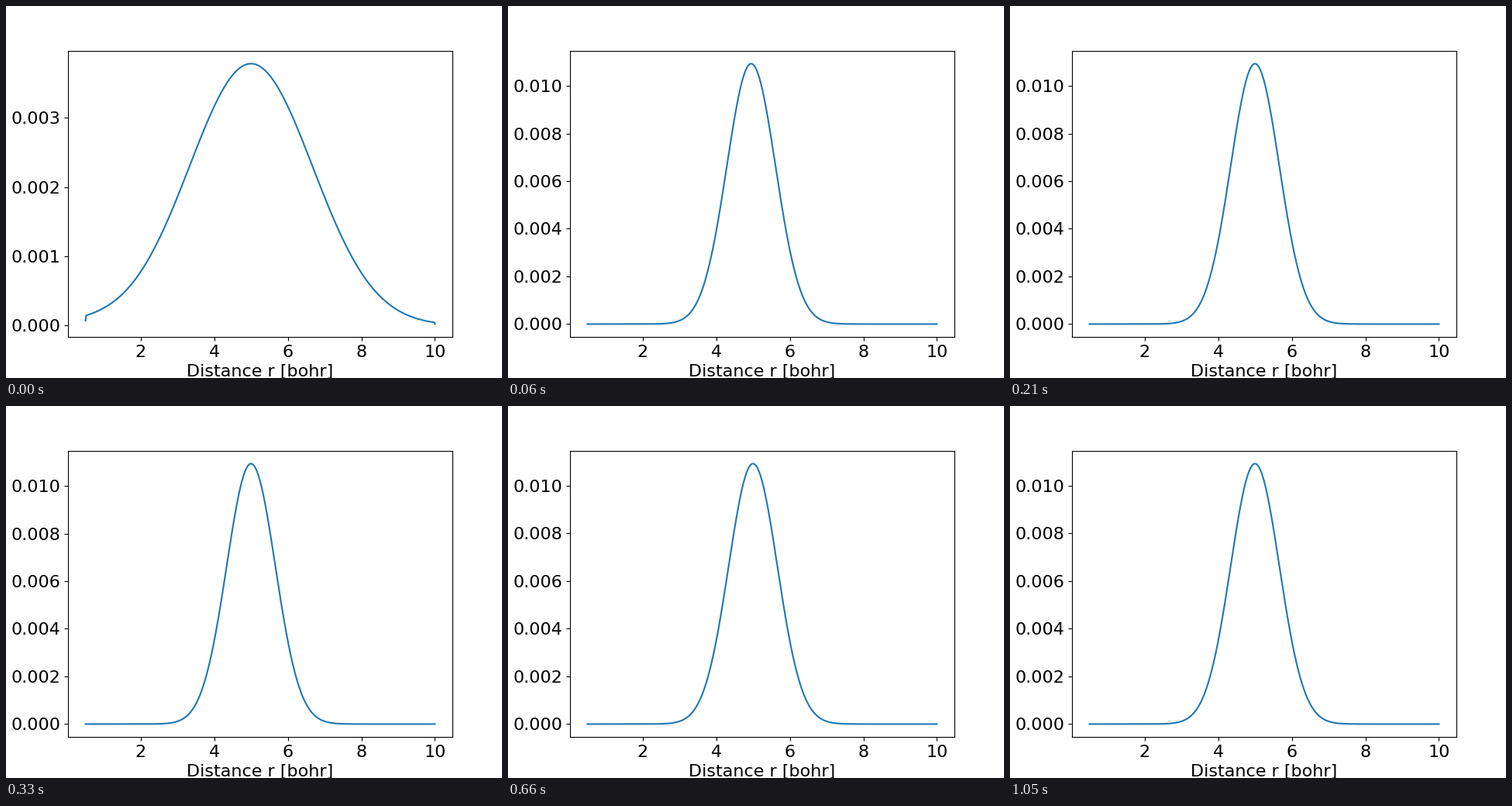
A matplotlib script for the animation above (1.87 s loop, 640x480 px).

```python
import numpy as np
import matplotlib.pyplot as plt
from matplotlib.animation import FuncAnimation

plt.rcParams.update({"font.family": "DejaVu Sans", "font.size": 16})

LOOP_MS = 1870
TICK_MS = 10
STEP_MS = 30
LAST_STEP = 35

r = np.linspace(0.5, 10, 500)


def gauss(height, center, decay):
    return height * np.exp(-decay * (r - center) ** 2)


def start_density():
    """Broad first guess; the end points carry half weight."""
    rho = gauss(3.78e-3, 5, 0.178) + gauss(4e-5, 0.5, 0.444)
    rho[[0, -1]] /= 2
    return rho


def density(step):
    """Density after the given iteration, relaxing to the fixed point."""
    if step == 0:
        return start_density()
    n = step - 1
    center = 5 - 0.275 * 0.18 ** n
    height = 1.093e-2 + 3.5e-5 * 0.75 ** n - 2.1e-4 * 0.1 ** n
    # constant area ties the width to the height
    return gauss(height, center, 1.14 * (height / 1.093e-2) ** 2)


fig, ax = plt.subplots(figsize=(6.4, 4.8), dpi=100)
line, = ax.plot(r, density(0))
ax.set_xlabel("Distance r [bohr]")


def update(i):
    step = min(i * TICK_MS // STEP_MS, LAST_STEP)
    line.set_ydata(density(step))
    ax.relim()
    ax.autoscale_view()
    return line,


anim = FuncAnimation(fig, update, frames=LOOP_MS // TICK_MS,
                     interval=TICK_MS, repeat=True, repeat_delay=0)
plt.show()
```
